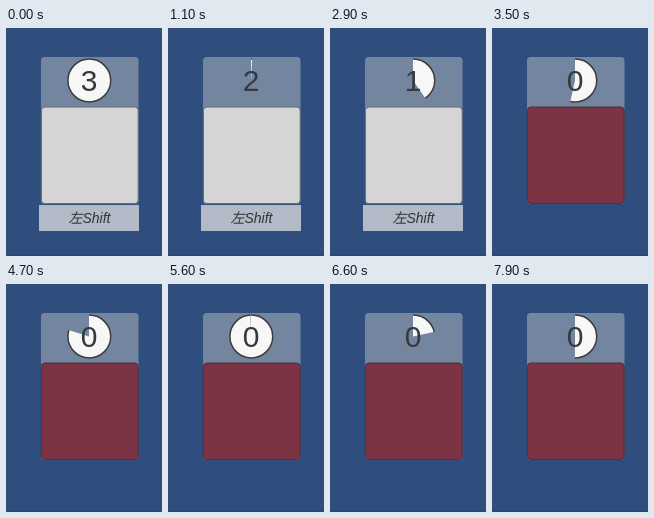
Recreate the animation shown at these times as an HTML page. Size 156 by 228 pixels, loop 8000 ms.

```html
<!DOCTYPE html>
<html lang="en">
<head>
<meta charset="utf-8">
<title>Charge counter</title>
<style>
  html, body { margin: 0; width: 100%; height: 100%; overflow: hidden; background: #2f4e7e; }
  svg { display: block; width: 100%; height: 100%; }
  text { text-anchor: middle; font-family: "Liberation Sans", "Noto Sans CJK SC", "Noto Sans CJK", sans-serif; }
</style>
</head>
<body>
<svg viewBox="0 0 156 228">
  <defs>
    <clipPath id="sector"><path id="wedge"/></clipPath>
  </defs>
  <rect width="156" height="228" fill="#2f4e7e"/>
  <rect y="226.5" width="156" height="1.5" fill="#2b4570"/>
  <rect x="35" y="29" width="97.5" height="147" rx="3.5" fill="#74869f"/>
  <rect id="panel" x="35.4" y="79" width="96.8" height="96.6" rx="3.5" stroke-width="1"/>
  <g id="label">
    <rect x="33" y="177" width="100" height="26" fill="#b2bac7"/>
    <text x="83.5" y="195" font-size="14" font-style="italic" fill="#333">左Shift</text>
  </g>
  <g clip-path="url(#sector)">
    <circle cx="83.3" cy="52.5" r="21.4" fill="#f7f7f7" stroke="#3c3c3c" stroke-width="1.5"/>
  </g>
  <text id="digit" x="83" y="63" font-size="30" fill="#37393e"></text>
</svg>
<script>
const LOOP = 8000, STEP = 100;
const FILL_START = 1062, FILL_TIME = 4557;
const CX = 83, CY = 52.5, REACH = 30;
// Each entry: time in ms, charges left from then on
const charges = [[0, 3], [1100, 2], [2300, 1], [3300, 0], [FILL_START + FILL_TIME, 1], [6600, 0]];

const $ = id => document.getElementById(id);
const [wedge, panel, label, digit] = ["wedge", "panel", "label", "digit"].map($);

function sectorPath(turn) {
  const a = Math.min(turn, 0.9999) * 2 * Math.PI;
  const x = CX + REACH * Math.sin(a), y = CY - REACH * Math.cos(a);
  return `M${CX} ${CY}V${CY - REACH}A${REACH} ${REACH} 0 ${turn > 0.5 ? 1 : 0} 1 ${x} ${y}Z`;
}

function draw(ms) {
  const t = Math.floor((ms % LOOP) / STEP) * STEP;
  const count = charges.filter(([start]) => start <= t).pop()[1];
  const turn = t < FILL_START ? 1 : ((t - FILL_START) / FILL_TIME) % 1;
  const ready = count > 0;

  wedge.setAttribute("d", sectorPath(turn));
  digit.textContent = count;
  panel.setAttribute("fill", ready ? "#d5d5d5" : "#7c3343");
  panel.setAttribute("stroke", ready ? "#626a76" : "#4b2f3c");
  label.style.display = ready ? "" : "none";
}

const begin = performance.now();
function tick() {
  draw(performance.now() - begin);
  requestAnimationFrame(tick);
}
tick();
</script>
</body>
</html>
```
